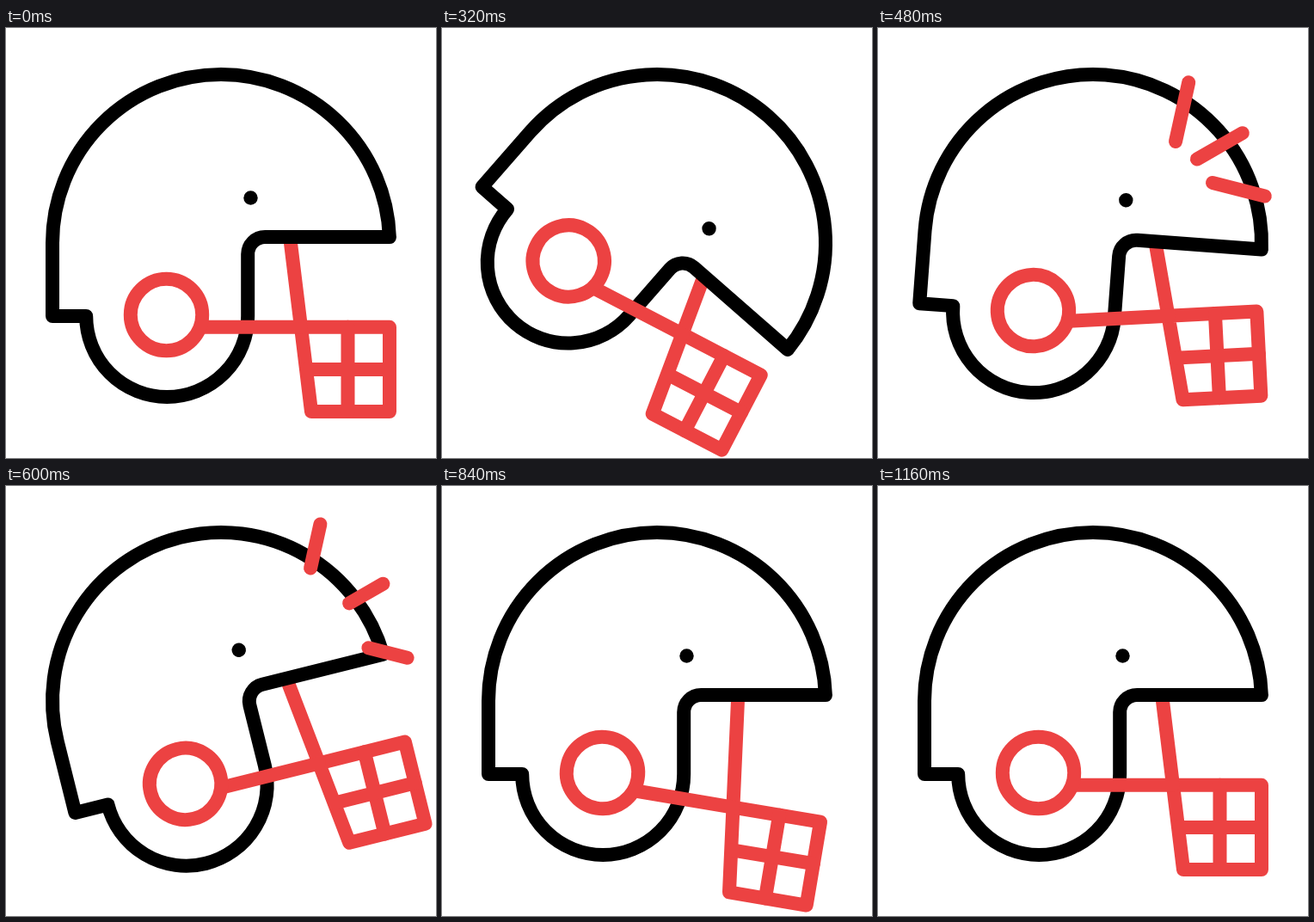
An HTML page with a canvas that plays this animation: 500x500 px, repeating every 2000 ms.

```html
<!DOCTYPE html>
<html lang="en">
<head>
<meta charset="utf-8">
<title>Helmet</title>
<style>
  html, body { margin: 0; width: 100%; height: 100%; overflow: hidden; background: #fff; }
  canvas { display: block; width: 100vw; height: 100vh; object-fit: contain; }
</style>
</head>
<body>
<canvas id="stage" width="500" height="500"></canvas>
<script>
const ctx = document.getElementById('stage').getContext('2d');
const LOOP = 2000, STEP = 40;
const BLACK = '#000', RED = '#ec4242';
const HUB = { x: 186.5, y: 333.5 };

// [time, value] keys, eased in and out between neighbours
const HEAD_TILT = [[0, 0], [280, 43.7], [600, -14], [828, 0]];
const MASK_TILT = [[0, 0], [270, -14.2], [854, 9.6], [1160, 0]];
const SPARK_HEAD = [[340, 0], [540, 1]];
const SPARK_TAIL = [[480, 0], [750, 1]];

// inner x, y, outer x, y
const SPARKS = [
  [346, 132, 365.4, 44.4],
  [371, 152.5, 438.4, 113.8],
  [389, 180, 466.6, 199.8]
];

function valueAt(keys, t) {
  if (t <= keys[0][0]) return keys[0][1];
  for (let i = 1; i < keys.length; i++) {
    const [t0, a] = keys[i - 1], [t1, b] = keys[i];
    if (t < t1) {
      const s = (t - t0) / (t1 - t0);
      return a + (b - a) * s * s * (3 - 2 * s);
    }
  }
  return keys[keys.length - 1][1];
}

function turn(deg, x, y) {
  ctx.translate(x, y);
  ctx.rotate(deg * Math.PI / 180);
  ctx.translate(-x, -y);
}

function line(...p) {
  ctx.beginPath();
  for (let i = 0; i < p.length; i += 2) ctx.lineTo(p[i], p[i + 1]);
  ctx.stroke();
}

function inMask(tilt, draw) {
  ctx.save();
  turn(tilt, HUB.x, HUB.y);
  ctx.strokeStyle = RED;
  draw();
  ctx.restore();
}

function strut() {
  line(327.3, 220, 343, 348);
}

function shell() {
  ctx.beginPath();
  ctx.arc(250, 250, 196, Math.PI, -0.036);
  ctx.lineTo(446, 243);
  ctx.arcTo(281.2, 243, 281.2, 262, 20);
  ctx.arc(187.2, 335, 94, 0, Math.PI);
  ctx.lineTo(54, 335);
  ctx.closePath();
  ctx.fillStyle = '#fff';
  ctx.fill();
  ctx.strokeStyle = BLACK;
  ctx.stroke();

  ctx.beginPath();
  ctx.arc(284.5, 197.5, 8.2, 0, 2 * Math.PI);
  ctx.fillStyle = BLACK;
  ctx.fill();
}

function cage() {
  line(343, 347.8, 446, 347.8, 446, 446, 355, 446, 343, 347.8);
  line(397.5, 347.8, 397.5, 446);
  line(350, 397, 446, 397);
  line(228, 347.8, 343, 347.8);
  ctx.beginPath();
  ctx.arc(HUB.x, HUB.y, 41.7, 0, 2 * Math.PI);
  ctx.stroke();
}

function sparks(t) {
  const head = valueAt(SPARK_HEAD, t), tail = valueAt(SPARK_TAIL, t);
  if (head <= tail) return;
  ctx.strokeStyle = RED;
  for (const [x0, y0, x1, y1] of SPARKS) {
    const dx = x1 - x0, dy = y1 - y0;
    line(x0 + dx * tail, y0 + dy * tail, x0 + dx * head, y0 + dy * head);
  }
}

function render(t) {
  const tilt = valueAt(MASK_TILT, t);
  ctx.fillStyle = '#fff';
  ctx.fillRect(0, 0, 500, 500);
  ctx.lineWidth = 16;
  ctx.lineCap = ctx.lineJoin = 'round';

  ctx.save();
  turn(valueAt(HEAD_TILT, t), 250, 250);
  inMask(tilt, strut);
  shell();
  inMask(tilt, cage);
  ctx.restore();

  sparks(t);
}

let start;
function tick(now) {
  if (start === undefined) start = now;
  // the motion advances in 40 ms steps; the small lead absorbs timer jitter
  render(Math.floor(((now - start + 8) % LOOP) / STEP) * STEP);
  requestAnimationFrame(tick);
}
render(0);
requestAnimationFrame(tick);
</script>
</body>
</html>
```
